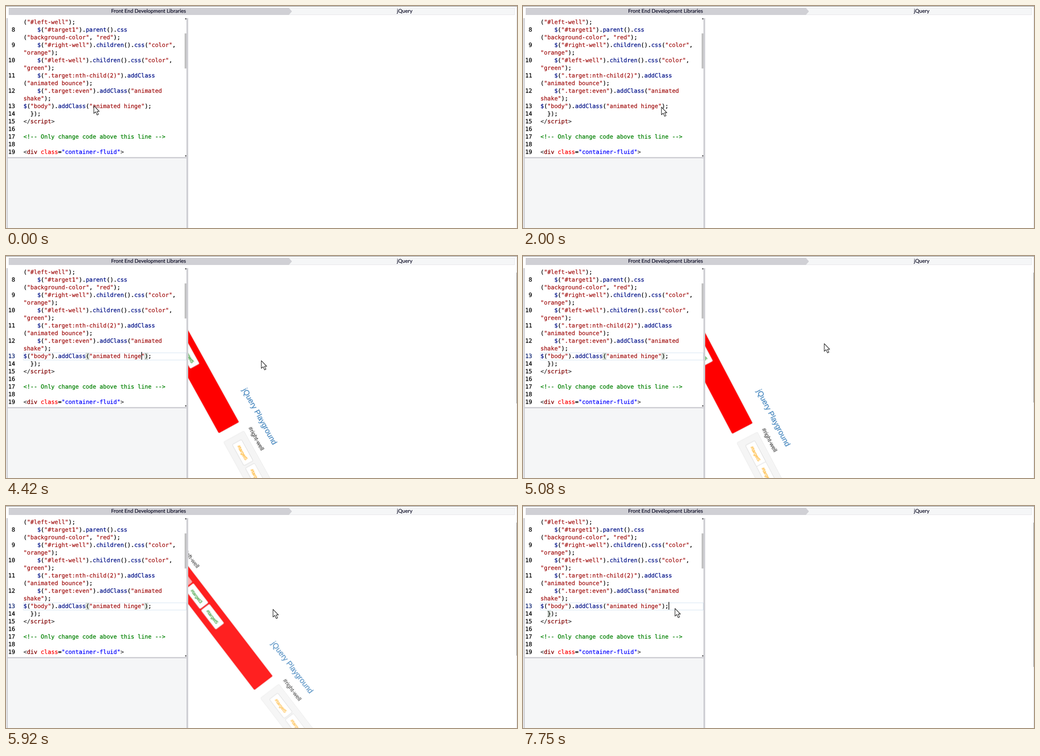
These frames come from a looping animation (1133x494 px, 8 s). An HTML page:

```html
<!DOCTYPE html>
<html lang="en">
<head>
<meta charset="utf-8">
<title>jQuery playground</title>
<style>
  html, body { margin: 0; width: 100%; height: 100%; overflow: hidden; background: #fff; }
  body { position: relative; text-rendering: geometricPrecision; -webkit-text-stroke: .2px; }
  .abs { position: absolute; }
  .scaled { position: absolute; transform: scale(.7083); transform-origin: 0 0; }
  .crumb { top: 4px; height: 16px; font: 11.5px/16px Lato, sans-serif; color: #0a0a23; text-align: center; }
  .bar { background: #d0d0d5; }

  pre { margin: 0; position: absolute; top: 0; font: 18px/24px "DejaVu Sans Mono", monospace; color: #000; -webkit-text-stroke: .4px; }
  .id { color: #018; } .str { color: #a31515; } .tag { color: #800000; } .punct { color: #383838; }
  .attr { color: #f00; } .val { color: #00f; } .note { color: #008000; }
  .caret { position: absolute; width: 2px; height: 24px; margin-top: -2px; background: #000; visibility: hidden; }
  .call .paren, .block .brace { background: rgba(0,100,0,.1); outline: 1px solid #b9b9b9; outline-offset: -1px; }
  #row { left: 38px; top: 214.5px; width: 360px; height: 15px; border: 1px solid #d3e4f1; }

  #view { left: 403.5px; top: 27px; width: 729.5px; height: 467px; overflow: hidden; }
  #page { position: relative; width: 1029px; height: 207px; font: 14px/20px "Liberation Sans", Arial, sans-serif; color: #333; }
  #page > * { position: absolute; box-sizing: border-box; margin: 0; white-space: nowrap; }
  h3 { top: 20px; width: 100%; font: 24px/26.4px "Liberation Sans", Arial, sans-serif; color: #337ab7; text-align: center; }
  h4 { top: 66.4px; font: 18px/19.8px "Liberation Sans", Arial, sans-serif; }
  .well { top: 96.2px; width: 484.5px; height: 74px; padding: 19px; border: 1px solid #e3e3e3; border-radius: 4px; background: #f5f5f5; }
  .well span { display: inline-block; padding: 6px 12px; border: 1px solid #ccc; border-radius: 4px; background: #fff; }
  .left { left: 15px; } .right { left: 529.5px; }
  .well.left { background: #f00; color: green; } .well.right { color: orange; }
</style>
</head>
<body>
<div class="abs" style="left:0;top:0;width:1133px;height:1px;background:#777"></div>
<div class="abs crumb" style="left:620px;width:508px;box-sizing:border-box;background:#f5f6f7;border:1px solid #e6e6ea;line-height:14px;text-indent:20px">jQuery</div>
<div class="abs crumb bar" style="left:6px;width:628px;clip-path:polygon(0 0,621px 0,100% 50%,621px 100%,0 100%)"><span style="position:relative;left:-4px">Front End Development Libraries</span></div>

<div class="abs" id="row"></div>
<div class="abs" id="editor" style="left:4px;top:27px;width:396px;height:308px;overflow:hidden">
  <div class="scaled" style="left:0;top:.5px">
    <pre style="width:23px;text-align:right"> 
8

9

10

11

12

<span id="num">13</span>
14
15
16
17
18
19</pre>
    <pre style="left:49px"><span id="js">("#left-well");
    $("#target1").parent().css
("background-color", "red");
    $("#right-well").children().css("color",
"orange");
    $("#left-well").children().css("color",
"green");
    $(".target:nth-child(2)").addClass
("animated bounce");
    $(".target:even").addClass("animated
shake");
</span><span class="id">$</span>(<span class="str">"body"</span>).<span class="id">addClass</span><span class="paren">(</span><span class="str">"animated hing<span id="lastChar">e</span><i class="caret" id="caretMid"></i>"</span><span class="paren">)</span>;<i class="caret" id="caretEnd"></i>
  <span class="brace">}</span>);
<span class="punct">&lt;/</span><span class="tag">script</span><span class="punct">&gt;</span>

<span class="note">&lt;!-- Only change code above this line --&gt;</span>

<span class="punct">&lt;</span><span class="tag">div</span> <span class="attr">class</span>=<span class="val">"container-fluid"</span><span class="punct">&gt;</span></pre>
  </div>
</div>
<div class="abs" style="left:396px;top:61px;width:4px;height:78px;background:#c1c1c1"></div>
<div class="abs" style="left:397px;top:27px;width:3px;height:3px;background:#777"></div>
<div class="abs" style="left:397px;top:332px;width:3px;height:3px;background:#777"></div>
<div class="abs" style="left:4px;top:339px;width:396px;height:155px;background:#f5f6f7"></div>
<div class="abs bar" style="left:1px;top:27px;width:3px;height:467px"></div>
<div class="abs bar" style="left:4px;top:335.5px;width:396px;height:3.5px"></div>
<div class="abs bar" style="left:400px;top:27px;width:3.5px;height:467px"></div>

<div class="abs" id="view">
  <div class="scaled" style="left:2.7px;top:0">
    <div id="page">
      <h3>jQuery Playground</h3>
      <h4 class="left">#left-well</h4>
      <div class="well left"><span class="shake" style="opacity:.65">#target1</span> <span class="bounce">#target3</span> <span class="shake">#target5</span></div>
      <h4 class="right">#right-well</h4>
      <div class="well right"><span>#target5</span> <span class="shake">#target6</span> <span>#target2</span></div>
    </div>
  </div>
</div>
<div class="abs" style="left:1132px;top:1px;width:1px;height:493px;background:#dcdce0"></div>
<div class="abs" id="thumb" style="left:1131.5px;top:37px;width:1.5px;background:#777"></div>
<svg class="abs" id="mouse" width="18" height="26" style="left:-2px;top:-2px">
  <path d="M2 2V19L6 15.5 9.2 22.5 12.2 21 9 14.5H14Z" fill="#fff" stroke="#333" stroke-width="1.3" stroke-linejoin="round"/>
</svg>

<script>
const $ = id => document.getElementById(id);
const LOOP = 8000, CLICK = 2830, CUT = 3330, RETYPE = 3420, RUN = 4143, SPEED = .955, RECLICK = 7580;

$("js").innerHTML = $("js").textContent.replace(/("[^"]*")|[$\w]+/g,
  (s, str) => `<span class="${str ? "str" : "id"}">${s}</span>`);

// Class animations of the previewed page, all scrubbed by one clock
const anims = [];
function scrub(el, frames, duration, delay = 0) {
  const anim = el.animate(frames, { duration, delay, fill: "both" });
  anim.pause();
  anims.push(anim);
}
const turn = deg => ({ transform: `rotate(${deg}deg)`, transformOrigin: "0 0", opacity: 1, easing: "ease-in-out" });
scrub($("page"), [turn(0), turn(80), turn(60), turn(80), turn(60),
  { transform: "translate(0, 700px)", transformOrigin: "50% 50%", opacity: 0 }], 2000);

const shift = x => `translateX(${x}px)`, lift = y => `translateY(${y}px)`;
for (const el of document.querySelectorAll(".shake"))
  scrub(el, { transform: [0, -10, 10, -10, 10, -10, 10, -10, 10, -10, 0].map(shift), easing: "ease" }, 1000, 45);
for (const el of document.querySelectorAll(".bounce"))
  scrub(el, { transform: [0, 0, -30, -30, 0, -15, 0, -4, 0].map(lift),
    offset: [0, .2, .4, .43, .53, .7, .8, .9, 1], easing: "ease" }, 1000, 45);

// Pointer stops: time, x, y
const path = [
  [0, 195, 222], [420, 86, 241], [500, 86, 241], [1080, 306, 223], [1170, 306, 223], [1420, 288, 222],
  [1500, 288, 222], [1830, 307, 223], [1920, 307, 223], [2000, 307, 225], [2330, 299, 223], [2829, 299, 223],
  [2830, 299, 218], [3840, 299, 218], [4420, 566, 233], [5080, 668, 195], [5670, 631, 236], [6250, 541, 222],
  [6340, 541, 222], [6580, 423, 214], [6920, 280, 230], [7090, 280, 230], [7250, 329, 230], [7340, 329, 230],
  [7500, 331, 239], [7750, 337, 228], [LOOP, 337, 228]
];
function pointer(t) {
  const i = path.findIndex(p => p[0] > t);
  const [t0, x0, y0] = path[i - 1], [t1, x1, y1] = path[i];
  const k = (t - t0) / (t1 - t0);
  return [x0 + (x1 - x0) * k, y0 + (y1 - y0) * k];
}

const blink = since => since >= 0 && since % 1000 < 500;
const show = (el, on) => el.style.visibility = on ? "visible" : "hidden";

function draw() {
  const t = performance.now() % LOOP;
  const focused = t >= CLICK, moved = t >= RECLICK, run = (t - RUN) * SPEED;

  $("editor").className = "abs " + (moved ? "block" : focused ? "call" : "");
  $("num").style.color = focused ? "#0b216f" : "";
  show($("row"), focused);
  $("lastChar").style.display = t >= CUT && t < RETYPE ? "none" : "";
  show($("caretMid"), !moved && blink(t - (t < RETYPE ? CLICK : RETYPE)));
  show($("caretEnd"), moved && blink(t - RECLICK));

  for (const a of anims) a.currentTime = Math.max(0, run);
  show($("view"), run >= 0);
  const docHeight = $("page").getBoundingClientRect().bottom - 18;
  show($("thumb"), run >= 0 && docHeight > 457);
  $("thumb").style.height = 457 * 457 / docHeight + "px";

  const [x, y] = pointer(t);
  $("mouse").style.transform = `translate(${x}px, ${y}px)`;
  requestAnimationFrame(draw);
}
draw();
</script>
</body>
</html>
```
